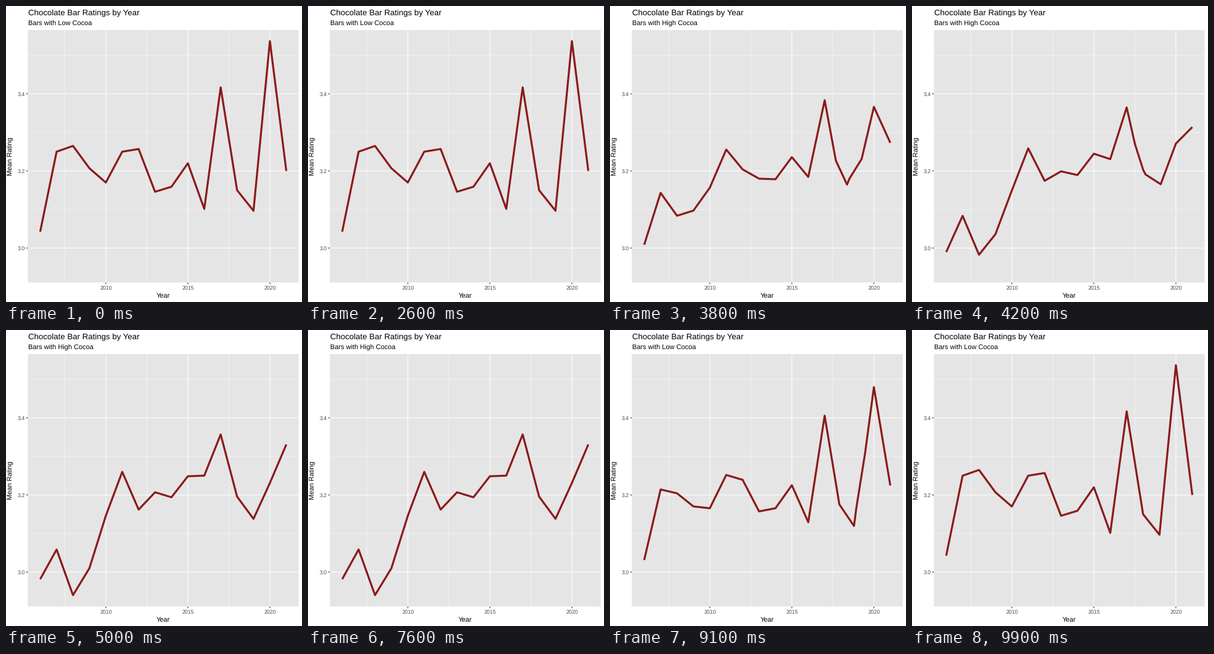
Write a matplotlib script that moves like this. It is 480 px wide and 480 px high and loops after 10000 ms.

```python
import numpy as np
import matplotlib.pyplot as plt
from matplotlib.animation import FuncAnimation
from matplotlib.patches import Rectangle

plt.rcParams["font.family"] = "Liberation Sans"
plt.rcParams["text.hinting"] = "none"

SIZE = 480
FRAMES, INTERVAL, PHASE = 100, 100, 25
LEFT, RIGHT, TOP, BOTTOM = 35.5, 474.5, 39, 448.4

YEARS = np.arange(2006, 2022)
LOW = [3.0425, 3.25, 3.265, 3.207, 3.170, 3.25, 3.257, 3.146,
       3.159, 3.22, 3.1015, 3.417, 3.15, 3.0967, 3.537, 3.2]
HIGH = [2.9815, 3.0585, 2.94, 3.01, 3.146, 3.26, 3.162, 3.207,
        3.194, 3.2485, 3.2502, 3.357, 3.1957, 3.138, 3.231, 3.331]


def px(year):
    return LEFT + (np.asarray(year) - 2005.25) * (RIGHT - LEFT) / 16.5


def py(rating):
    return 392.5 - (np.asarray(rating) - 3) * 625


def resample(ratings):
    """Split each segment in 3, the longest in 7, giving 50 points."""
    parts = np.full(len(ratings) - 1, 3)
    parts[np.argmax(np.abs(np.diff(ratings)))] = 7
    knots = np.concatenate([[0], np.cumsum(parts)])
    steps = np.arange(knots[-1] + 1)
    return np.column_stack([px(np.interp(steps, knots, YEARS)),
                            py(np.interp(steps, knots, ratings))])


def cubic_in_out(t):
    return 4 * t ** 3 if t < 0.5 else 1 - 4 * (1 - t) ** 3


fig = plt.figure(figsize=(SIZE / 72, SIZE / 72), dpi=72, facecolor="white")
ax = fig.add_axes([0, 0, 1, 1])
ax.set_xlim(0, SIZE)
ax.set_ylim(SIZE, 0)
ax.axis("off")


def rule(xs, ys, color="white", width=1.07):
    ax.plot(xs, ys, color=color, lw=width, solid_capstyle="butt", snap=False)


def label(x, y, text, size, color="black", **kw):
    return ax.text(x, y, text, size=size, color=color, **kw)


ax.add_patch(Rectangle((LEFT, TOP), RIGHT - LEFT, BOTTOM - TOP,
                       fc="#E5E5E5", lw=0, snap=False))

for rating in (3.1, 3.3, 3.5):
    rule([LEFT, RIGHT], [py(rating)] * 2, width=0.53)
for year in (2007.5, 2012.5, 2017.5):
    rule([px(year)] * 2, [TOP, BOTTOM], width=0.53)

for rating in (3.0, 3.2, 3.4):
    y = py(rating)
    rule([LEFT, RIGHT], [y, y])
    rule([LEFT - 2.75, LEFT], [y, y], "#333333")
    label(30.5, y + 3.2, f"{rating:.1f}", 8.8, "#4D4D4D", ha="right")
for year in (2010, 2015, 2020):
    x = px(year)
    rule([x, x], [TOP, BOTTOM])
    rule([x, x], [BOTTOM, BOTTOM + 2.75], "#333333")
    label(x, 460, str(year), 8.8, "#4D4D4D", ha="center")

label(LEFT, 15, "Chocolate Bar Ratings by Year", 13.2)
subtitle = label(LEFT, 32, "", 11)
label((LEFT + RIGHT) / 2, 473, "Year", 11, ha="center")
label(13.4, (TOP + BOTTOM) / 2, "Mean Rating", 11, rotation=90,
      ha="right", va="center", rotation_mode="default")

low_path, high_path = resample(LOW), resample(HIGH)
line, = ax.plot([], [], color="#8B1A1A", lw=3.2, solid_capstyle="butt",
                solid_joinstyle="round", snap=False)


def update(frame):
    phase, step = divmod(frame, PHASE)
    t = step / PHASE
    high = (0, t, 1, 1 - t)[phase]
    mix = cubic_in_out(high)
    path = low_path + (high_path - low_path) * mix
    line.set_data(path[:, 0], path[:, 1])
    subtitle.set_text(f"Bars with {'High' if high > 0.5 else 'Low'} Cocoa")
    return line, subtitle


anim = FuncAnimation(fig, update, frames=FRAMES, interval=INTERVAL,
                     repeat=True, repeat_delay=0)
plt.show()
```
